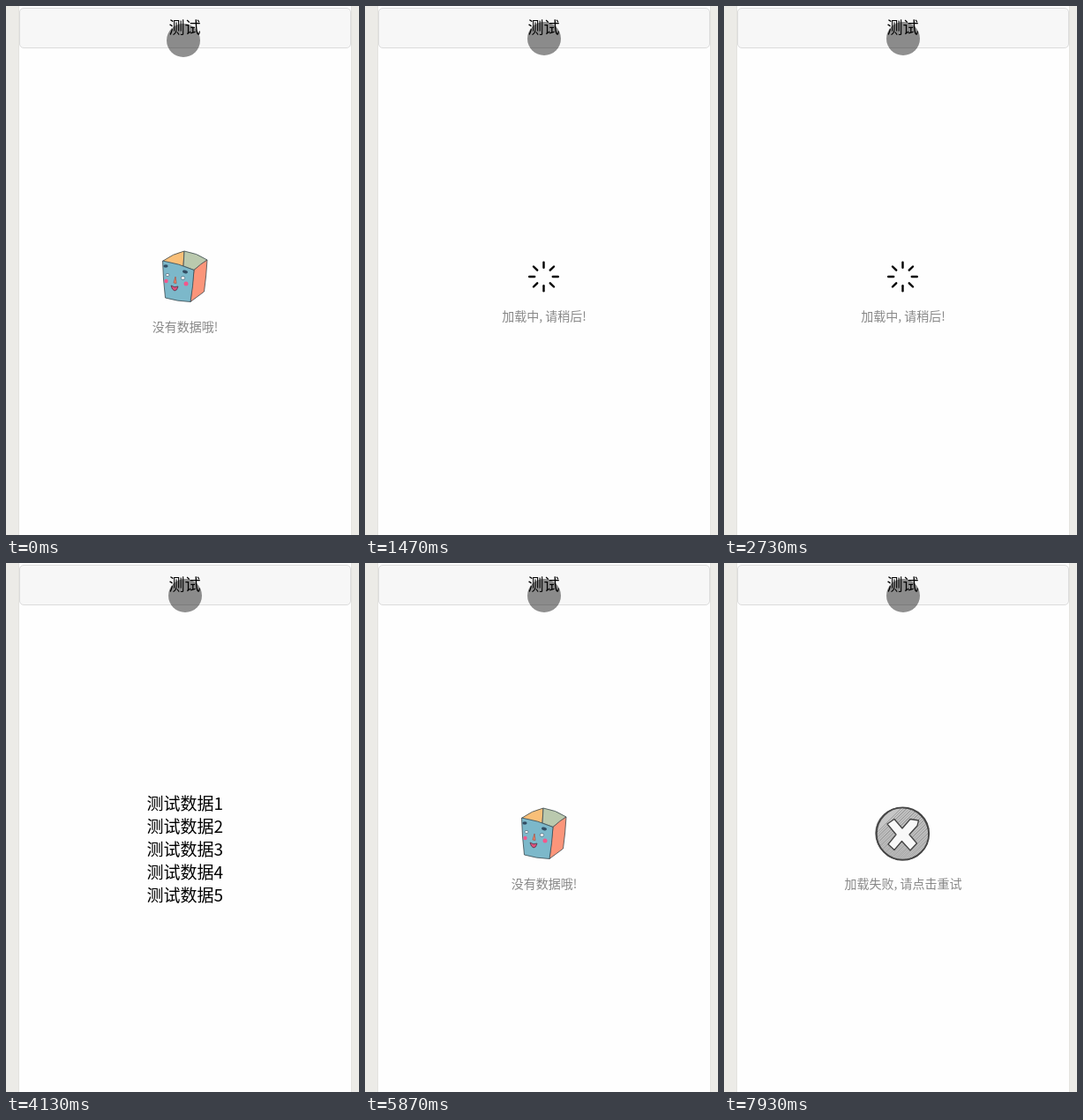
Animation of 400 by 600 pixels, one loop 8 s. Source, as an HTML page:

```html
<!DOCTYPE html>
<html lang="zh-CN">
<meta charset="utf-8">
<title>测试</title>
<style>
  html, body { margin: 0; width: 100%; height: 100%; overflow: hidden; background: #ecebe7; }
  svg { display: block; width: 400px; height: 600px; font-family: "Noto Sans CJK SC", "Noto Sans CJK", sans-serif; }
  .note { font-size: 14px; fill: #888; text-anchor: middle; }
  .line { stroke: #3c4a50; stroke-width: .8; stroke-linejoin: round; }
</style>
<svg viewBox="0 0 400 600">
  <defs>
    <clipPath id="disc"><circle cx="202.5" cy="307" r="29"/></clipPath>
  </defs>
  <rect x="14" width="378" height="600" fill="#e4e3df"/>
  <rect x="15" width="376" height="600" fill="#fefefe"/>
  <rect x="15.5" y="2.5" width="375" height="45" rx="4.5" fill="#f7f7f7" stroke="#dcdcdc"/>
  <text x="202.5" y="31" font-size="18" text-anchor="middle">测试</text>

  <g id="empty">
    <g class="line">
      <path d="M178 289Q189 281 202 278L201 295L190 297Z" fill="#f9bf78"/>
      <path d="M202 278Q216 280 228 288L213 299.500L201 295Z" fill="#bac9ae"/>
      <path d="M213 299.500Q221 292 228 288Q227 306 224.500 324L209 335.500Z" fill="#fb957a"/>
      <path d="M177.500 289Q196 292 213 299.500Q212 318 209 335.500Q194 335 180.500 331Q178 310 177.500 289Z" fill="#7cb8ca"/>
    </g>
    <g fill="#324d63">
      <ellipse cx="181" cy="295" rx="2.600" ry="1.800"/>
      <ellipse cx="203" cy="301.500" rx="3" ry="1.700" transform="rotate(15 203 301.500)"/>
    </g>
    <g fill="#fff" stroke="#456" stroke-width=".6">
      <ellipse cx="183" cy="305" rx="2" ry="1.600"/>
      <ellipse cx="200.500" cy="308.500" rx="2.200" ry="1.800"/>
    </g>
    <g fill="#f2588c">
      <circle cx="181.500" cy="312" r="2.200"/>
      <circle cx="204" cy="315" r="2.500"/>
    </g>
    <path d="M192 307L190 314L193 314.500Z" fill="#f58a6c" stroke="#a5503f" stroke-width=".7"/>
    <path d="M187 317Q191 320 195 318Q194 323 191 323Q188 322 187 317Z" fill="#e0507c" stroke="#543447" stroke-width=".8"/>
    <text class="note" x="203" y="369">没有数据哦!</text>
  </g>

  <g id="loading">
    <g id="spin" stroke="#000" stroke-width="2.400" stroke-linecap="round"></g>
    <text class="note" x="203" y="357">加载中, 请稍后!</text>
  </g>

  <g id="list" font-size="19"></g>

  <g id="fail">
    <circle cx="202.500" cy="307" r="29.500" fill="#c6c6c6"/>
    <path id="hatch" clip-path="url(#disc)" stroke="#8d8d8d" stroke-width=".7"/>
    <g fill="none" stroke="#444">
      <circle cx="202.500" cy="307" r="29.700" stroke-width="1.800"/>
      <ellipse cx="202" cy="307.300" rx="30.300" ry="29.500" stroke-width=".8" transform="rotate(35 202 307)"/>
    </g>
    <path d="M185 296L193 290.500L202 301L211 290.500L220.500 292L219 298L210 308L218.500 318L211 326L201.500 315.500L193 325.500L186 319L195 308Z" fill="#f8f8f8" stroke="#444" stroke-width="1.300" stroke-linejoin="round"/>
    <text class="note" x="203" y="369">加载失败, 请点击重试</text>
  </g>

  <circle id="touch" r="19" fill="#000" fill-opacity=".44"/>
</svg>
<script>
  const LOOP = 8000, LOAD = 1010;
  const taps = [667, 2430, 4590, 6610];
  const results = ['empty', 'list', 'empty', 'fail'];
  const views = ['empty', 'loading', 'list', 'fail'];
  const el = id => document.getElementById(id);
  const repeat = (n, make) => Array.from({ length: n }, (_, i) => make(i)).join('');

  el('spin').innerHTML = repeat(8, i =>
    `<line y1="-16.300" y2="-10.300" transform="rotate(${i * 45})"/>`);
  el('list').innerHTML = repeat(5, i =>
    `<text x="159.500" y="${280 + i * 26}">测试数据${i + 1}</text>`);
  el('hatch').setAttribute('d', repeat(42, i =>
    `M${142 + i * 2.2} 337l${60 + i % 3} -60`));

  function draw(now) {
    const t = now % LOOP;
    const last = taps.filter(tap => tap <= t).length - 1;
    const age = t - taps[last];
    const view = last < 0 ? 'empty' : age < LOAD ? 'loading' : results[last];
    for (const id of views) el(id).style.display = id === view ? '' : 'none';

    // The spinner turns once a second in twelve steps
    const angle = Math.floor(age * 12 / 1000) * 30 || 0;
    el('spin').setAttribute('transform', `translate(202.500 307) rotate(${angle})`);

    const p = Math.min(1, Math.max(0, (t - 70) / 400));
    el('touch').setAttribute('cx', 201 + 2 * p);
    el('touch').setAttribute('cy', 39 - 2 * p);
  }

  const start = performance.now();
  function tick() {
    draw(performance.now() - start);
    requestAnimationFrame(tick);
  }
  tick();
</script>
</html>
```
